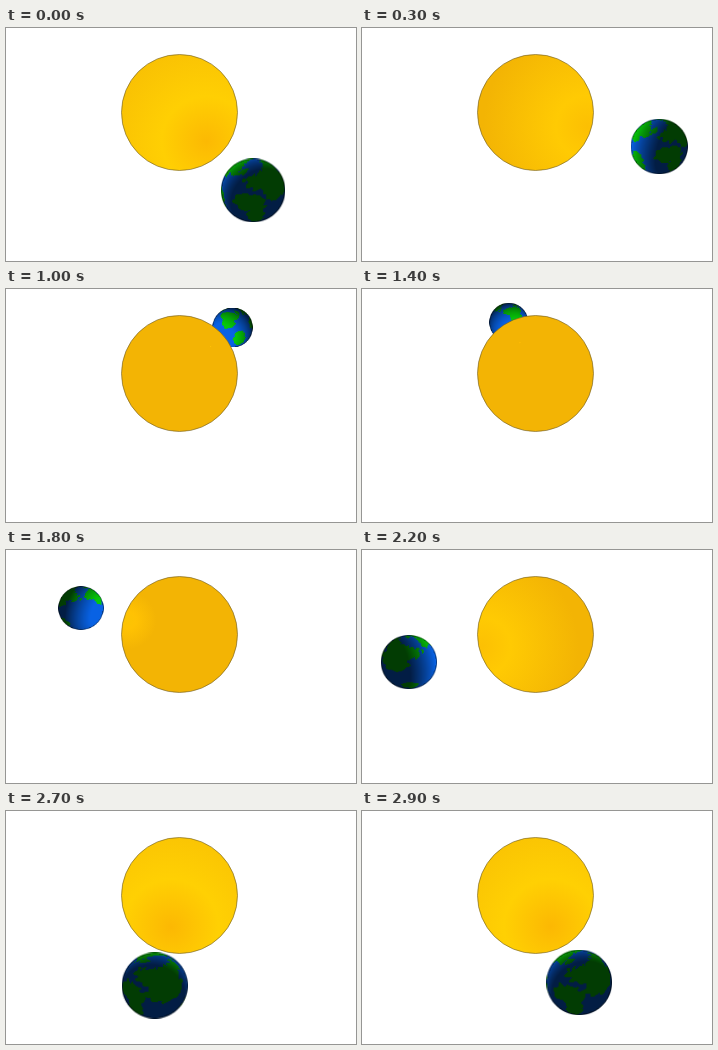
Animation, 350 px wide and 233 px high, one loop 3 s. Source, as an HTML page with a canvas:

```html
<!DOCTYPE html>
<html lang="en">
<head>
<meta charset="utf-8">
<title>Earth orbiting the Sun</title>
<style>
  html, body { margin: 0; width: 100%; height: 100%; overflow: hidden; background: #fff; }
  canvas { display: block; }
</style>
</head>
<body>
<canvas id="stage" width="350" height="233"></canvas>
<script>
const ctx = document.getElementById('stage').getContext('2d');
const SUN = { x: 173.5, y: 84.5, r: 58 };
const STEPS = 30, STEP_MS = 100, SIZE = 64, DEG = Math.PI / 180;
const VIEW_TILT = 33, AXIS_LEAN = 10;
const clamp = (v, lo, hi) => Math.max(lo, Math.min(hi, v));

// Each land mass is a rough ellipse on the globe, in degrees
const lands = [
  { lon: -100, lat: 58, w: 55, h: 15 },
  { lon: -97, lat: 38, w: 24, h: 17 },
  { lon: -40, lat: 73, w: 17, h: 10 },
  { lon: -60, lat: -14, w: 19, h: 27 },
  { lon: 13, lat: 17, w: 32, h: 18 },
  { lon: 25, lat: -12, w: 16, h: 25 },
  { lon: 85, lat: 56, w: 95, h: 18 },
  { lon: 88, lat: 29, w: 44, h: 19 },
  { lon: 134, lat: -25, w: 20, h: 12 }
];

function isLand(lon, lat) {
  const coast = 1 + 0.16 * Math.sin(lon * 0.27 + 2 * Math.sin(lat * 0.21))
                  + 0.16 * Math.sin(lat * 0.43 - lon * 0.17);
  return lands.some(land => {
    const dLon = ((lon - land.lon) % 360 + 540) % 360 - 180;
    return (dLon / land.w) ** 2 + ((lat - land.lat) / land.h) ** 2 < coast;
  });
}

const globe = document.createElement('canvas');
globe.width = globe.height = SIZE;
const globeCtx = globe.getContext('2d');
const pixels = globeCtx.createImageData(SIZE, SIZE);

function paintGlobe(centreLon, sin, cos) {
  const sinView = Math.sin(VIEW_TILT * DEG), cosView = Math.cos(VIEW_TILT * DEG);
  const tilt = (VIEW_TILT + AXIS_LEAN * cos) * DEG;
  const sinTilt = Math.sin(tilt), cosTilt = Math.cos(tilt);
  for (let j = 0; j < SIZE; j++) for (let i = 0; i < SIZE; i++) {
    const x = (i + 0.5) * 2 / SIZE - 1, y = 1 - (j + 0.5) * 2 / SIZE;
    const d = Math.hypot(x, y), z = Math.sqrt(Math.max(0, 1 - d * d));
    const up = y * cosTilt + z * sinTilt, front = z * cosTilt - y * sinTilt;
    const lat = Math.asin(clamp(up, -1, 1)) / DEG;
    const lon = centreLon + Math.atan2(x, front) / DEG;
    // Sunlight comes from the middle of the orbit and wraps softly past the terminator
    const facing = -x * sin + (y * sinView - z * cosView) * cos;
    const light = clamp((facing + 0.32) / 1.1, 0, 1);
    const shade = (0.3 + 0.7 * light) * (d > 0.96 ? 0.6 : 1);
    const colour = isLand(lon, lat) ? [6, 200, 10] : [8, 98, 228];
    const at = (j * SIZE + i) * 4;
    colour.forEach((c, k) => pixels.data[at + k] = c * shade);
    pixels.data[at + 3] = 255 * clamp((1 - d) * SIZE / 2 + 0.5, 0, 1);
  }
  globeCtx.putImageData(pixels, 0, 0);
}

function drawEarth(step, sin, cos) {
  const scale = 1 / (1 - 0.265 * cos);
  const x = 173 + 122.4 * sin * scale, y = 84.7 + 67 * cos * scale;
  const ry = 24.4 * scale, rx = ry * (1 + 0.045 * sin * sin);
  paintGlobe(20 - 12 * step + 22 * Math.sin(Math.PI * step / STEPS), sin, cos);
  ctx.drawImage(globe, x - rx, y - ry, 2 * rx, 2 * ry);
}

function drawSun(sin, cos) {
  const x = SUN.x + SUN.r * sin, y = SUN.y + 32 * cos;
  const reach = Math.max(1, 60 + (cos > 0 ? 100 : 70) * cos);
  const glow = ctx.createRadialGradient(x, y, 0, x, y, reach);
  glow.addColorStop(0, `rgb(252, ${196 - 12 * Math.max(0, cos)}, 3)`);
  glow.addColorStop(0.3, `rgb(255, ${198 + 10 * cos}, 3)`);
  glow.addColorStop(1, '#f3b404');
  ctx.beginPath();
  ctx.arc(SUN.x, SUN.y, SUN.r, 0, 2 * Math.PI);
  ctx.fillStyle = glow;
  ctx.fill();
  ctx.strokeStyle = '#6b5a28';
  ctx.lineWidth = 0.6;
  ctx.stroke();
}

function draw(now) {
  const step = Math.floor(now / STEP_MS) % STEPS;
  const angle = 12 * (step + 2.3) * DEG;
  const sin = Math.sin(angle), cos = Math.cos(angle);
  ctx.clearRect(0, 0, 350, 233);
  if (cos < 0) drawEarth(step, sin, cos);
  drawSun(sin, cos);
  if (cos >= 0) drawEarth(step, sin, cos);
}

const start = performance.now();
function tick() {
  draw(performance.now() - start);
  requestAnimationFrame(tick);
}
tick();
</script>
</body>
</html>
```
